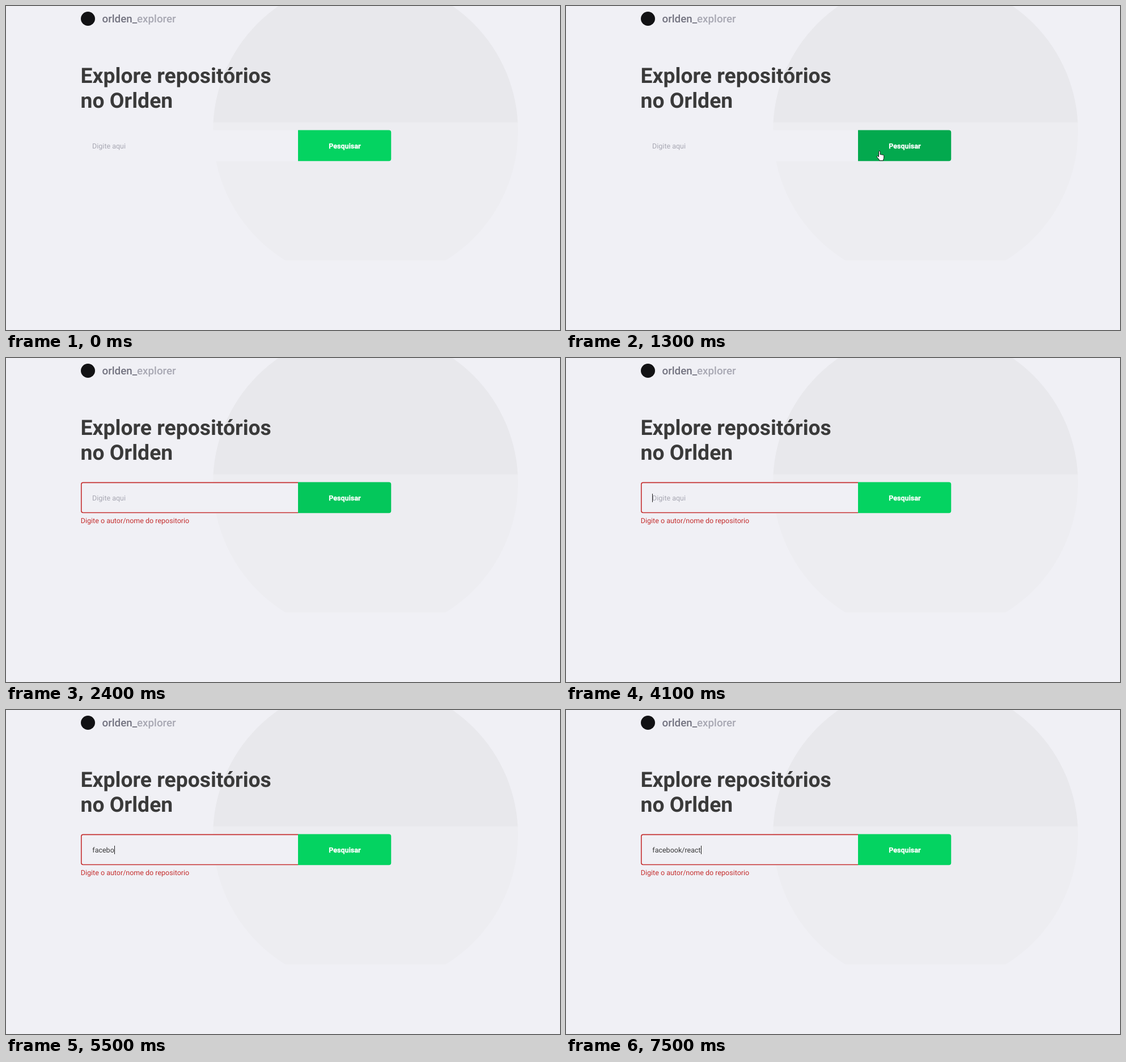
These frames come from a looping animation (977 by 573 pixels, 8000 ms). An HTML page:

```html
<!DOCTYPE html>
<html lang="pt-BR">
<head>
<meta charset="utf-8">
<title>Explorer</title>
<style>
  html, body { margin: 0; width: 100%; height: 100%; overflow: hidden; background: #f0f0f5; }
  svg { display: block; width: 977px; height: 573px; font: 12.5px Roboto, sans-serif; text-rendering: geometricPrecision; }
  .brand { font-size: 18.8px; font-weight: 500; }
  .title { font-size: 37.3px; font-weight: 700; fill: #3a3a3a; }
  .hint { fill: #a8a8b3; }
  .label { font-weight: 700; fill: #fff; stroke: #fff; stroke-width: .35; text-anchor: middle; }
  .cursor { fill: #fff; stroke: #111; stroke-width: 1; stroke-linejoin: round; }
</style>
</head>
<body>
<svg viewBox="0 0 977 573">
  <defs>
    <linearGradient id="bands" gradientUnits="userSpaceOnUse" x1="0" y1="0" x2="0" y2="412">
      <stop offset=".5" stop-color="#e8e8ec"/>
      <stop offset=".5" stop-color="#ededf1"/>
    </linearGradient>
    <clipPath id="page"><rect width="977" height="450"/></clipPath>
  </defs>

  <circle cx="634" cy="221" r="269" fill="url(#bands)" clip-path="url(#page)"/>

  <circle cx="144.5" cy="22.5" r="12.5" fill="#121214"/>
  <g class="brand">
    <text x="169.5" y="29" fill="#737380">orlden_</text>
    <text x="231" y="29" fill="#a8a8b3">explorer</text>
  </g>

  <g class="title">
    <text x="131.6" y="135.7">Explore repositórios</text>
    <text x="131.6" y="179.5">no Orlden</text>
  </g>

  <path d="M515 219.6H136a4 4 0 0 0-4 4V270.3a4 4 0 0 0 4 4H515z" fill="#f0f0f5"/>
  <g id="error">
    <path d="M515 220.4H136a3.2 3.2 0 0 0-3.2 3.2V270.3a3.2 3.2 0 0 0 3.2 3.2H515" fill="none" stroke="#c53030" stroke-width="1.6"/>
    <text x="131.8" y="292" fill="#c53030">Digite o autor/nome do repositorio</text>
  </g>
  <text id="hint" class="hint" x="152.1" y="251.5">Digite aqui</text>
  <text id="typed" x="152.3" y="251.5" fill="#3a3a3a"></text>
  <rect id="caret" y="240" width="1" height="15" fill="#222"/>

  <path id="button" d="M515 219.6H675.2a4 4 0 0 1 4 4V270.3a4 4 0 0 1-4 4H515z"/>
  <text class="label" x="597.4" y="251.5">Pesquisar</text>

  <path id="arrow" class="cursor" d="M.5.5V13l2.9-2.7 1.9 4.2 1.9-.8-1.9-4.2H9.3z"/>
  <path id="hand" class="cursor" d="M4 10V1.8a1.3 1.3 0 0 1 2.6 0V7c.2-.8 2.3-.7 2.4.3c.4-.7 2.2-.5 2.3.5c.5-.5 1.9-.2 1.9 1V12c0 2-1.2 2.6-1.2 5.3H5.2c0-2-3.4-4.5-4.4-6.5c-.7-1.4 1-2 2-1L4 10.8z"/>
</svg>
<script>
  const LOOP = 8000;
  const $ = id => document.getElementById(id);
  const typed = $('typed');

  // Each track is a list of [start ms, value].
  const pointer = [
    [0, null], [500, ['arrow', 92, 86]], [600, ['arrow', 111, 114]], [700, null],
    [1200, ['arrow', 490, 135]], [1300, ['hand', 547.5, 256]],
    [2300, ['hand', 497.5, 245.5]], [2400, null]
  ];
  const fill = [
    [0, '#04d361'], [1300, '#03a94e'], [2400, '#04c75b'], [2500, '#04d361']
  ];
  const error = [[0, false], [1500, true]];
  const caretOn = [
    [0, false], [3100, true], [3600, false], [4100, true], [6200, false], [6600, true]
  ];
  const letters = [
    [0, 0], [4700, 1], [4900, 2], [5000, 3], [5100, 4], [5300, 5], [5500, 6],
    [5700, 8], [6600, 9], [6900, 11], [7200, 12], [7300, 13], [7500, 14]
  ];

  const at = (track, t) => track.findLast(([start]) => start <= t)[1];
  const show = (id, on) => $(id).style.display = on ? '' : 'none';

  function draw(t) {
    const [shape, x, y] = at(pointer, t) || [];
    for (const id of ['arrow', 'hand']) show(id, id === shape);
    if (shape) $(shape).setAttribute('transform', `translate(${x} ${y})`);

    $('button').setAttribute('fill', at(fill, t));
    show('error', at(error, t));

    const text = 'facebook/react'.slice(0, at(letters, t));
    if (typed.textContent !== text) typed.textContent = text;
    show('hint', !text);
    const width = text ? typed.getComputedTextLength() : 0;
    $('caret').setAttribute('x', Math.round(152.3 + width));
    show('caret', at(caretOn, t));
  }

  const began = performance.now();
  function tick() {
    draw((performance.now() - began) % LOOP);
    requestAnimationFrame(tick);
  }
  tick();
</script>
</body>
</html>
```
